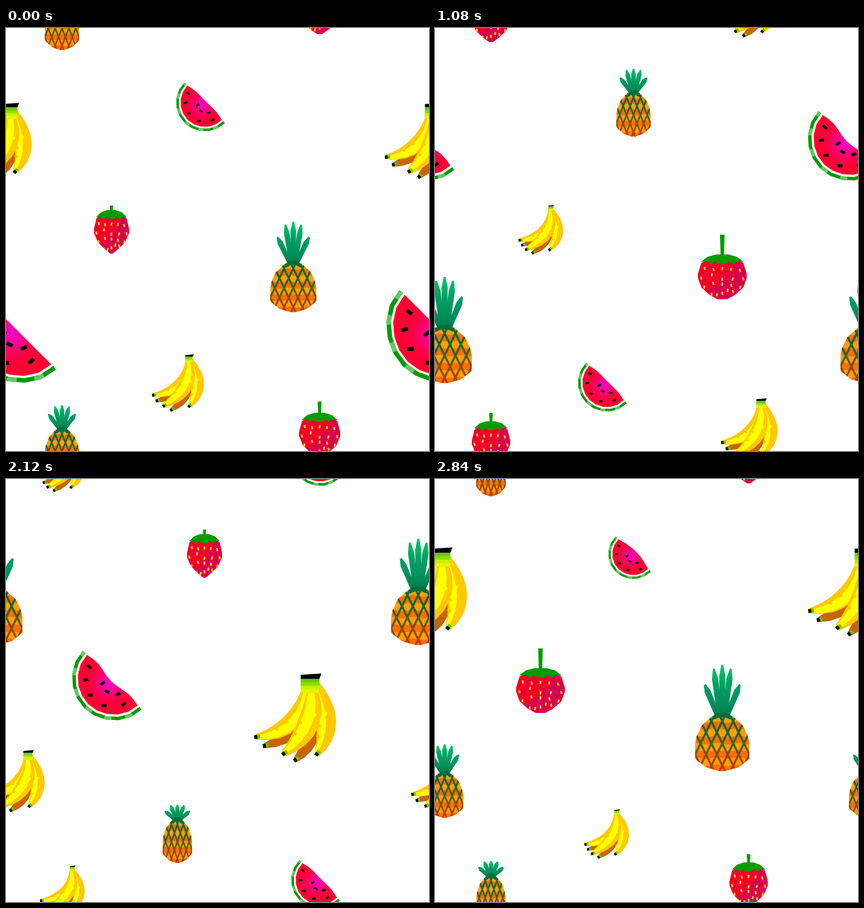
Animation of 748 by 748 pixels, one loop 2880 ms. Source, as an HTML page with a canvas:

```html
<!DOCTYPE html>
<html lang="en">
<head>
<meta charset="utf-8">
<title>Fruit pattern</title>
<style>
  html, body { margin: 0; width: 100%; height: 100%; overflow: hidden; background: #fff; }
  canvas { display: block; }
</style>
</head>
<body>
<canvas id="stage" width="748" height="748"></canvas>
<script>
const SIZE = 748, FRAME = 40, CYCLE = 36, TURN = 9;
const ctx = document.getElementById('stage').getContext('2d');

// Centre of each spot and the frame at which its watermelon turn begins.
const spots = [
  [99, 727, 4], [554.5, 709.5, 11], [351, 132, 31], [729, 199.5, 26],
  [186.5, 356.5, 15], [508, 422.5, 8], [765, 534, 0], [303, 627.5, 22]
];

// How swollen a fruit is in each of its five poses.
const softSwell = [1, .55, 0, .13, .245];
const fullSwell = [1, .67, 0, .2, .32];

const mix = (a, b, t) => a + (b - a) * t;
const mirror = right => right.concat(right.map(([x, y]) => [-x, y]).reverse());
const range = (n, make) => Array.from({ length: n }, (_, i) => make(i));
const noise = i => { const v = Math.sin(i * 12.9898 + 4) * 43758.5453; return v - Math.floor(v); };

function trace(points, close = true) {
  ctx.beginPath();
  points.forEach(([x, y]) => ctx.lineTo(x, y));
  if (close) ctx.closePath();
}

function fill(points, color) {
  ctx.fillStyle = color;
  trace(points);
  ctx.fill();
}

function mark(x, y, w, h, angle, color) {
  ctx.save();
  ctx.translate(x, y);
  ctx.rotate(angle);
  ctx.fillStyle = color;
  ctx.fillRect(-w / 2, -h / 2, w, h);
  ctx.restore();
}

function gradient(g, stops) {
  stops.forEach((color, i) => g.addColorStop(i / (stops.length - 1), color));
  return g;
}

// A half disc, cut along its upper right diagonal.
function watermelon(pose) {
  const s = softSwell[pose], r = mix(76, 158, s) / 2;
  ctx.translate(-8 + mix(.2, .12, s) * r, 8 - mix(.19, .11, s) * r);
  const polar = (turn, radius) => [Math.cos(turn) * radius * r, Math.sin(turn) * radius * r];
  const arc = scale => range(11, i => {
    const a = Math.PI * i / 10;
    return polar(a + Math.PI / 4, scale * (1.11 + .1 * s * Math.cos(a) ** 4));
  });

  trace(arc(1), false);
  ctx.lineWidth = .1 * r;
  ctx.strokeStyle = '#009b00';
  ctx.stroke();
  ctx.setLineDash([.22 * r, .4 * r]);
  ctx.lineDashOffset = -.3 * r;
  ctx.strokeStyle = '#64c864';
  ctx.stroke();
  ctx.setLineDash([]);

  const skin = arc(mix(.88, .91, s)), end = skin[0], start = skin[10];
  const hump = Math.max(0, .17 - .6 * s), wave = .2 * s * (1 - s);
  const cut = range(11, i => {
    const f = i / 10;
    const lift = (hump * Math.sin(Math.PI * f) + wave * Math.sin(3 * Math.PI * f)) * r;
    return [mix(start[0], end[0], f) + lift * .7, mix(start[1], end[1], f) - lift * .7];
  });
  fill(skin.concat(cut), gradient(ctx.createRadialGradient(-.1 * r, .1 * r, 0, -.1 * r, .1 * r, .75 * r),
    ['#ff00c8', '#ff00a0', '#ff0064', '#ff003c', '#ff0032']));

  const pip = (degrees, radius, tilt) =>
    mark(...polar(degrees * Math.PI / 180, radius), .15 * r, .085 * r, tilt, '#000');
  for (let i = 0; i < 5; i++) pip(65 + (45 - 2.2 * i) * i, .78, [-.7, 0, 0, -.2, .7][i]);
  for (let i = 0; i < 3; i++) pip(68 + 47 * i, .44 - .07 * i, [-.4, .5, -.7][i]);
}

// Fingers from back to front; tip is [x when slim, x when swollen, y], in half sizes.
const fingers = [
  { tip: [-.84, -.74, .63], bend: [.42, .38, .36], girth: .19, dark: true },
  { tip: [-.36, .05, .95], bend: [.62, .72, .45], girth: .2, dark: true },
  { tip: [-.96, -.96, .43], bend: [.5, .28, .3], girth: .2, shine: [-.35, .8] },
  { tip: [.41, .6, .82], bend: [1.12, 1.12, .15], girth: .24, shine: [-.8, -.05] },
  { tip: [-.66, -.25, .81], bend: [.74, .72, .15], girth: .26, shine: [-.7, .35] }
];

function banana(pose) {
  const s = fullSwell[pose], fat = Math.min(1, s * 1.4);
  const rx = mix(77, 138, s) / 2, ry = mix(87, 157, s) / 2;
  const stemX = mix(.47, .43, fat), stemHalf = mix(.11, .24, fat);
  const tipSize = 2 + rx * .07;

  for (const { tip, bend, girth, dark, shine } of fingers) {
    const end = [mix(tip[0], tip[1], fat), tip[2]], knee = [mix(bend[0], bend[1], fat), bend[2]];
    const root = [stemX + (end[0] + .25) * stemHalf * .6, -.82];
    const at = (t, side) => {
      const u = 1 - t, width = girth * (.3 + .75 * Math.sin(Math.PI * t)) * side;
      const x = u * u * root[0] + 2 * u * t * knee[0] + t * t * end[0];
      const y = u * u * root[1] + 2 * u * t * knee[1] + t * t * end[1];
      const dx = u * (knee[0] - root[0]) + t * (end[0] - knee[0]);
      const dy = u * (knee[1] - root[1]) + t * (end[1] - knee[1]);
      const length = Math.hypot(dx, dy);
      return [(x + dy / length * width) * rx, (y - dx / length * width) * ry];
    };
    const strip = (a, b) => range(9, i => at(i / 8, a)).concat(range(9, i => at(1 - i / 8, b)));

    fill(strip(-1, 1), dark ? '#c86400' : '#ffc800');
    if (shine) {
      fill(strip(...shine), '#ffff00');
      for (const t of [.4, .58, .75]) {
        mark(...at(t, shine[t > .5 ? 0 : 1]), .1 * rx, .07 * rx, t * 5, t > .5 ? '#ffc800' : '#ffff00');
      }
    }
    const [x, y] = at(1, 0), lean = Math.atan2(end[1] - knee[1], end[0] - knee[0]);
    mark(x - Math.cos(lean) * tipSize * .6, y - Math.sin(lean) * tipSize * .6, tipSize, tipSize, lean, '#64c800');
    mark(x, y, tipSize * .8, tipSize, lean, '#000');
  }

  const left = (stemX - stemHalf) * rx, right = (stemX + stemHalf) * rx;
  const capEnd = mix(-.94, -.88, fat) * ry, stemEnd = mix(-.78, -.57, fat) * ry;
  ['#6ec800', '#8cdc00', '#c8f000', '#f0f000'].forEach((color, i) => {
    const y = mix(capEnd, stemEnd, i / 4);
    ctx.fillStyle = color;
    ctx.fillRect(left, y, right - left, stemEnd - y);
  });
  fill([[left, -.97 * ry], [right + .05 * rx, -ry], [right, capEnd], [left, capEnd]], '#000');
}

// The body keeps its height and grows wider, while the stalk grows longer.
function strawberry(pose) {
  const s = softSwell[pose], r = mix(62, 106, s) / 2;
  const height = mix(85, 138, s), stalk = mix(8, 57, s), unit = (height - stalk) / 78;
  ctx.translate(0, -height / 2 + stalk);
  const scaled = pts => pts.map(([x, y]) => [x * r, y * unit]);
  const outline = scaled(mirror([
    [.4, 3], [.86, 15], [1, 34], [1, 41], [mix(.77, .92, s), 58], [mix(.33, .64, s), 71], [mix(.06, .3, s), 78]
  ]));

  fill(outline, '#f0002a');
  ctx.save();
  trace(outline);
  ctx.clip();
  fill(scaled([[.6, 10], [.4, 30], [-.1, 46], [-.35, 58], [-.75, 64], [-.5, 80], [1, 80], [1, 10]]), '#d8004e');
  for (let i = 0; i < 20; i++) {
    const row = Math.floor(i / 5), reach = [.72, .86, .74, .44][row];
    const x = (i % 5 - 2) / 2 * reach, y = 25 + row * 14 + (noise(i) - .5) * 9;
    mark(x * r, y * unit, 3.2, 5.5, (noise(i + 50) - .5) * .6, '#ffc81e');
  }
  ctx.restore();

  const thick = mix(3, 5, s);
  fill([[-thick, -stalk], [thick, -stalk], [thick * .7, 2], [-thick * .7, 2]], '#009b00');
  fill(scaled(mirror([[.25, 0], [.6, 4], [.88, 13], [.62, 12], [.45, 17], [.3, 12], [.15, 16]])), '#009b00');
}

function pineapple(pose) {
  const s = fullSwell[pose], r = mix(52, 96, s) / 2, height = mix(103, 188, s);
  const bodyH = mix(76, 98, s * s), leafH = height - bodyH;
  const neck = mix(6, 15, s * s), blade = mix(3.8, 5.5, s);
  ctx.translate(0, -height / 2);

  const green = gradient(ctx.createLinearGradient(0, 0, 0, leafH),
    ['#00c86e', '#00b464', '#00a064', '#00965f', '#008c5a', '#007846']);
  const leaf = (x, y, foot) => {
    const dx = foot - x, dy = leafH - y, length = Math.hypot(dx, dy);
    const nx = dy / length * blade, ny = -dx / length * blade;
    const across = (f, k) => [x + dx * f + nx * k, y + dy * f + ny * k];
    fill([across(0, -.3), across(0, .3), across(.22, 1), across(1, .8), across(1, -.8), across(.22, -1)], green);
  };
  for (const side of [-1, 1]) {
    leaf(side * mix(22, 31, s), mix(11, 35, s), side * neck * .55);
    leaf(side * mix(12, 15, s), mix(1, 7, s), side * neck * .3);
  }
  leaf(0, 0, 0);

  ctx.translate(0, leafH);
  const scaled = pts => pts.map(([x, y]) => [x * r, y * bodyH]);
  const outline = scaled(mirror([[.36, 0], [.76, .18], [.95, .38], [1, .52], [1, .78], [.6, .93], [.1, 1]]));
  ctx.save();
  trace(outline);
  ctx.clip();
  ctx.fillStyle = '#ffa000';
  ctx.fillRect(-r, 0, r * 2, bodyH);
  for (let top = .1; top < 1; top += .26) {
    const edge = offset => range(6, i => [i * .4 - 1, top + offset + (i % 2 ? .03 : 0)]);
    fill(scaled(edge(0).concat(edge(.13).reverse())), '#ff6e00');
  }
  ctx.strokeStyle = gradient(ctx.createLinearGradient(0, 0, 0, bodyH),
    ['#006e3c', '#0a6432', '#3c5f28', '#8c4b14', '#be3c00']);
  ctx.lineWidth = 1.5 + r / 22;
  ctx.beginPath();
  for (let i = -5; i <= 5; i++) {
    for (const side of [-.5, .5]) {
      ctx.moveTo((i * .4 - side) * r, 0);
      ctx.lineTo((i * .4 + side) * r, bodyH);
    }
  }
  ctx.stroke();
  ctx.restore();
  fill(mirror([[neck * .7, -5], [r * .36, 2], [r * .3, 7], [r * .12, 3]]), '#006e3c');
}

const fruits = [watermelon, banana, strawberry, pineapple];

function draw(frame) {
  ctx.fillStyle = '#fff';
  ctx.fillRect(0, 0, SIZE, SIZE);
  for (const [x, y, start] of spots) {
    const step = (frame - start + CYCLE) % CYCLE;
    const fruit = fruits[Math.floor(step / TURN)];
    const pose = Math.ceil(step % TURN / 2); // first pose lasts one frame, the others two
    for (const dx of [-SIZE, 0, SIZE]) {
      for (const dy of [-SIZE, 0, SIZE]) {
        const px = x + dx, py = y + dy;
        if (Math.min(px, py) < -100 || Math.max(px, py) > SIZE + 100) continue;
        ctx.save();
        ctx.translate(px, py);
        fruit(pose);
        ctx.restore();
      }
    }
  }
}

let shown = -1;
function tick() {
  const frame = Math.floor(performance.now() / FRAME) % CYCLE;
  if (frame !== shown) draw(shown = frame);
  requestAnimationFrame(tick);
}
tick();
</script>
</body>
</html>
```
